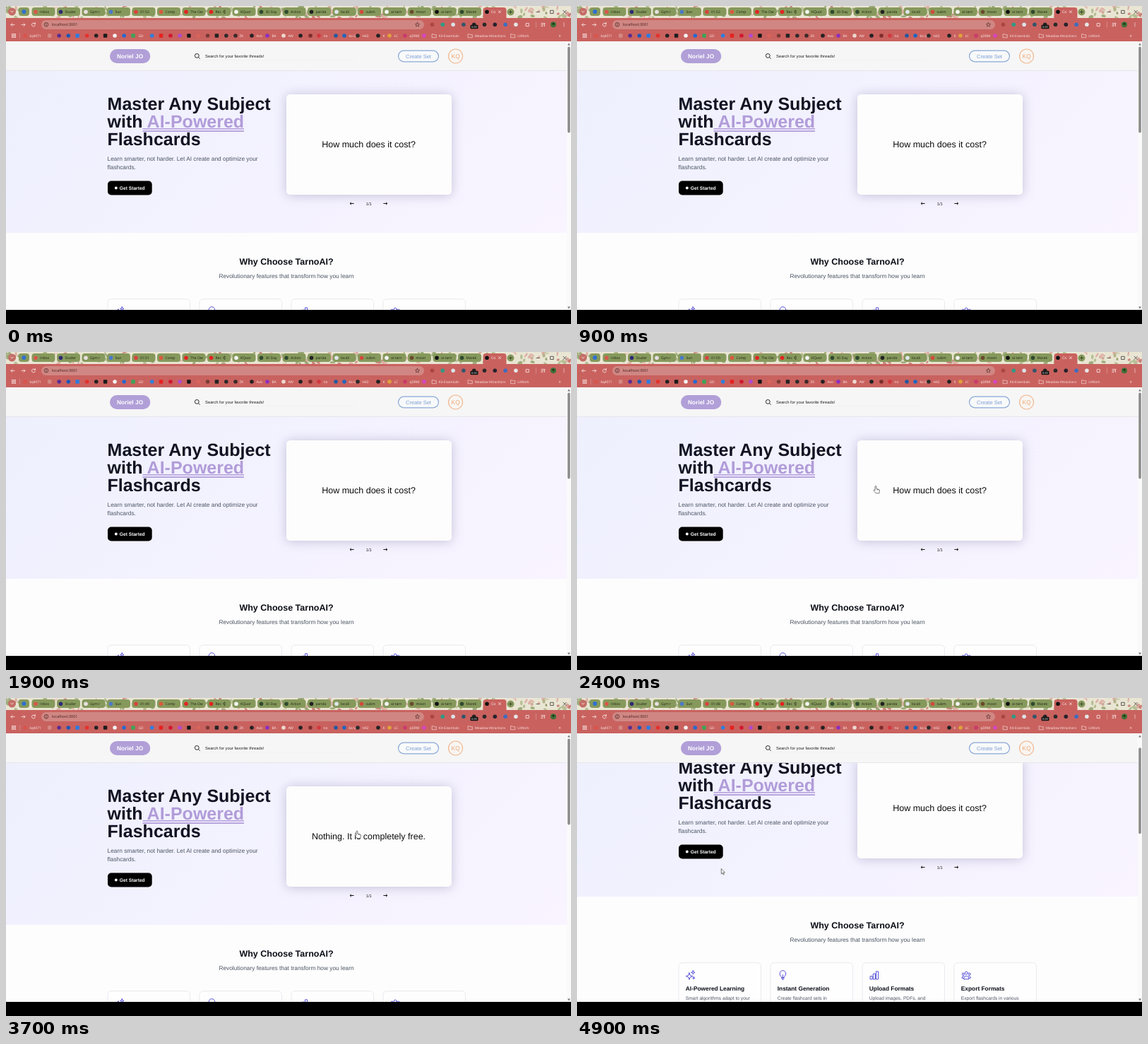
Write an HTML page that moves like this. It is 800x450 px and loops after 5000 ms.

```html
<!DOCTYPE html>
<html lang="en">
<head>
<meta charset="utf-8">
<title>Flashcards</title>
<style>
  html, body { margin: 0; width: 100%; height: 100%; overflow: hidden; background: #000; }
  svg { display: block; width: 800px; height: 450px; }
  text { font-family: "Liberation Sans", Arial, sans-serif; white-space: pre; text-rendering: geometricPrecision; }
  .ui text { font-family: "Open Sans", "Noto Sans", sans-serif; }
  #card { filter: drop-shadow(0 1px 8px rgba(70, 60, 120, .28)); }
</style>
</head>
<body>
<svg id="stage" viewBox="0 0 800 450">
  <defs>
    <linearGradient id="hero" gradientUnits="userSpaceOnUse" x1="141" y1="-50" x2="653" y2="462">
      <stop offset="0" stop-color="#eef0fe"/><stop offset="1" stop-color="#f9f4ff"/>
    </linearGradient>
    <clipPath id="view"><rect y="50" width="794" height="380"/></clipPath>
    <clipPath id="strip"><rect width="800" height="17"/></clipPath>
  </defs>
  <rect width="800" height="430" fill="#fdfdfd"/>
  <g clip-path="url(#view)"><g id="page">
    <rect y="91" width="794" height="230" fill="url(#hero)"/>
    <g font-size="25" font-weight="700" fill="#111322">
      <text x="143.6" y="146.7">Master Any Subject</text>
      <text x="143.6" y="171.7">with<tspan fill="#b19cd9"> AI-Powered</tspan></text>
      <text x="143.6" y="196.7">Flashcards</text>
    </g>
    <path d="M193.5 173.7H337M193.5 177.1H337" stroke="#b19cd9" stroke-width="1.6"/>
    <g font-size="8.33" fill="#4b5563">
      <text x="143.6" y="219.3">Learn smarter, not harder. Let AI create and optimize your</text>
      <text x="143.6" y="231">flashcards.</text>
      <text x="397" y="385" text-anchor="middle">Revolutionary features that transform how you learn</text>
    </g>
    <rect x="144" y="247.5" width="62.7" height="20" rx="5" fill="#000"/>
    <circle cx="155.8" cy="257.5" r="1.9" fill="#fff"/>
    <text x="160.8" y="259.8" font-size="6.67" font-weight="700" fill="#fff">Get Started</text>
    <path id="card" fill="#fdfdfd"/>
    <text id="face" text-anchor="middle" y="4.3" font-size="12.5" fill="#0c0c0e"></text>
    <path d="M492.5 279.5H487M488.8 277.8L487 279.5L488.8 281.2M534.4 279.5H539.9M538.1 277.8L539.9 279.5L538.1 281.2"
      fill="none" stroke="#111" stroke-width="1"/>
    <text x="513.7" y="281.6" text-anchor="middle" font-size="5.83" fill="#222">1/1</text>
    <text x="397" y="366.4" text-anchor="middle" font-size="12.5" font-weight="700" fill="#0d0f18">Why Choose TarnoAI?</text>
    <g id="features"></g>
  </g></g>

  <g id="header">
    <rect y="50" width="794" height="41.5" fill="#f6f6f6"/>
    <path d="M0 91.5H794" stroke="#e3e3e8" stroke-width=".8"/>
    <rect x="147" y="61" width="57.3" height="20" rx="10" fill="#b19fd8"/>
    <text x="175.6" y="74" text-anchor="middle" font-size="8.33" font-weight="700" fill="#fff">Noriel JO</text>
    <path d="M266 76.8H489Q493 76.5 493 72" fill="none" stroke="#f0f0f1" stroke-width=".7"/>
    <g fill="none" stroke="#222" stroke-width="1"><circle cx="270.3" cy="70.4" r="2.9"/><path d="M272.4 72.5L274.6 74.7"/></g>
    <text x="282" y="73.2" font-size="5.83" fill="#222">Search for your favorite threads!</text>
    <rect x="555.5" y="63.2" width="57" height="15.6" rx="7.8" fill="#f8f9fa" stroke="#8ba9d8" stroke-width="1.2"/>
    <text x="584" y="73.6" text-anchor="middle" font-size="7.5" fill="#7f9fd4">Create Set</text>
    <circle cx="636.6" cy="71" r="10" fill="#f8f5f2" stroke="#f0b78f" stroke-width="1.2"/>
    <text x="636.6" y="74" text-anchor="middle" font-size="8.3" fill="#eba777">KQ</text>
  </g>

  <rect x="794" y="50" width="6" height="380" fill="#fafafa"/>
  <path d="M795 55.5L797 52.5L799 55.5ZM795 425.5L797 428.5L799 425.5Z" fill="#777"/>
  <rect id="thumb" x="795.2" y="57.5" width="3.6" height="122" rx="1.8" fill="#8c8c8c"/>

  <g class="ui">
    <rect width="800" height="17" fill="#e9e5d3"/>
    <g id="floral" clip-path="url(#strip)"></g>
    <g id="tabs"></g>
    <rect y="17" width="800" height="33" fill="#c9625f"/>
    <rect x="50" y="20" width="542" height="13" rx="6.5" fill="#d08783"/>
    <g id="bar"></g>
  </g>

  <g id="cursor" fill="#fff" stroke="#333" stroke-width=".65" stroke-linejoin="round">
    <path id="hand" d="M-1 1C-1-.3.9-.3.9 1V4.2L3.8 4.8C5.2 5.1 5.6 5.7 5.4 7L4.8 10.4H.2L-2.8 6.8C-3.3 5.8-2.3 5.2-1 6.4ZM2.4 4.6V6M4 5V6.3"/>
    <path id="arrow" d="M0 0V7.4L1.7 5.9L2.8 8.5L4 8L2.9 5.5H5.2Z"/>
  </g>
  <rect y="430" width="800" height="20" fill="#000"/>
</svg>
<script>
const LOOP = 5000;
const $ = id => document.getElementById(id);

function add(parent, tag, attrs, text) {
  const node = document.createElementNS("http://www.w3.org/2000/svg", tag);
  for (const key in attrs) node.setAttribute(key, attrs[key]);
  if (text) node.textContent = text;
  parent.appendChild(node);
  return node;
}
const dot = (parent, x, y, r, fill) => add(parent, "circle", { cx: x, cy: y, r, fill });
const label = (parent, x, y, size, fill, text) => add(parent, "text", { x, y, "font-size": size, fill }, text);
const line = (parent, d, stroke, width) =>
  add(parent, "path", { d, stroke, "stroke-width": width, fill: "none", "stroke-linecap": "round", "stroke-linejoin": "round" });

function seeded(seed) {
  return () => (seed = (seed * 16807) % 2147483647) / 2147483647;
}

// Leaves and roses behind the tabs
function drawFloral() {
  const rnd = seeded(77), tones = ["#8b9d66", "#efe9db", "#d9a59c", "#a9b585", "#f1e6da", "#c4736c"];
  for (let i = 0; i < 260; i++) {
    const x = rnd() * 800, y = rnd() * 17;
    add($("floral"), "ellipse", {
      cx: x, cy: y, rx: 1.5 + rnd() * 3, ry: 1 + rnd() * 1.6,
      fill: tones[Math.floor(rnd() * tones.length)], opacity: .8,
      transform: `rotate(${rnd() * 180} ${x} ${y})`
    });
  }
}

function drawTabs() {
  const g = $("tabs"), green = "#86995c";
  const tabs = [
    ["Inbox", "#d8574a"], ["Studer", "#2d2a72"], ["Gym r", "#e8dfe4"], ["Sun", "#4a79c9"], ["01:52", "#d8433c"],
    ["Comp", "#d9593c"], ["The Ow", "#e32320"], ["Rec", "#e32320"], ["KQuor", "#f4f4f4"], ["30 Day", "#2f4a2f"],
    ["Action", "#2f4a2f"], ["panda", "#222"], ["locali", "#dfe8ee"], ["subm", "#d24a3c"], ["ai-tarn", "#f4f4f4"],
    ["moon", "#6b4a2c"], ["ai-tarn", "#111"], ["Marek", "#2f4a2f"], ["Co", "#111"]
  ];
  let clock;
  dot(g, 8.5, 8, 5.5, "#c46d66");
  line(g, "M6.8 7.2L8.5 8.9L10.2 7.2", "#fff", .8);
  add(g, "rect", { x: 18, y: 2, width: 15, height: 12, rx: 4, fill: green });
  dot(g, 25.4, 8, 3, "#2f6fd0");
  tabs.forEach(([name, color], i) => {
    const x = 36.5 + 35.5 * i, active = i === tabs.length - 1;
    add(g, "rect", {
      x, y: 2, width: 33, height: active ? 18 : 12, rx: 4, fill: active ? "#c9625f" : green
    });
    dot(g, x + 5.5, 8.2, 2.8, color);
    const title = label(g, x + 11.5, 10, 5, active ? "#fff" : "#1d2413", name);
    if (i === 4) clock = title;
    if (i === 7) line(g, `M${x + 23} 7.2v2l2 1.4v-4.8l-2 1.4`, "#1d2413", .6);
  });
  line(g, "M697.5 6.7l3 3m0-3l-3 3", "#fff", .7);
  dot(g, 714.5, 8.5, 5, green);
  line(g, "M712.3 8.5h4.4m-2.2-2.2v4.4", "#26301a", .7);
  line(g, "M751 8.5h4.5M771 6.3h4.2v4.2h-4.2zM789 6.2l4.4 4.4m0-4.4l-4.4 4.4", "#222", .7);
  return clock;
}

function drawBar() {
  const g = $("bar"), ink = "#fbecea", dark = "#43201f";
  line(g, "M12 26.5H7m2-2L7 26.5l2 2M22 26.5h5m-2-2l2 2l-2 2", ink, .8);
  line(g, "M41 25a2.5 2.5 0 1 0 .4 2.2M41.4 23.4v1.9h-1.9", ink, .8);
  add(g, "circle", { cx: 57, cy: 26.3, r: 2.8, fill: "none", stroke: dark, "stroke-width": .7 });
  line(g, "M57 26v1.5M57 24.9v.1", dark, .7);
  label(g, 65, 28.3, 5.4, dark, "localhost:3001");
  line(g, "M582.5 23.3l.9 2l2.2.2l-1.7 1.4l.5 2.2l-1.9-1.2l-1.9 1.2l.5-2.2l-1.7-1.4l2.2-.2z", dark, .6);

  ["#a94740", "#2f9a83", "#dbe2e6", "#35556b", "#222", "#292929", "#27232b", "#3f6cc0", "#e5e5e5"]
    .forEach((c, i) => dot(g, 603.5 + 14.8 * i, 26.3, 2.8, c));
  add(g, "rect", { x: 657.5, y: 26.8, width: 11, height: 5.4, rx: 1.2, fill: "#111" });
  label(g, 658.9, 31.2, 4, "#fff", "0.00");
  line(g, "M736.5 24.6h3.8v4h-3.8z", ink, .8);
  line(g, "M750.5 22.5v7.5", "#e39b97", .7);
  line(g, "M758 24.5h5m-5 2h3m-3 2h2m2.5 0v-3", ink, .8);
  dot(g, 775, 26.3, 4, "#3f6f35");
  dot(g, 775, 25.3, 1.4, "#1d2a1a");
  for (const y of [24.2, 26.4, 28.6]) dot(g, 790, y, .65, ink);

  for (let i = 0; i < 9; i++)
    add(g, "rect", { x: 8 + (i % 3) * 2.2, y: 39 + Math.floor(i / 3) * 2.2, width: 1.5, height: 1.5, fill: ink });
  line(g, "M19.5 38.5v7", "#e39b97", .6);

  const marks = ["#d38a84", "#5a2d91", "#1f57b5", "#2c7be0", "#e5322d", "#222", "#1b1b1b", "#f2f2f2", "#2869cf", "#3aa655",
    "", "#2d7fe0", "#e6201f", "#d3172e", "#b04ad2", "#161616", "#d9645b", "#7a3a35", "#222", "#2b2b2b", "#3a2a2a"];
  marks.forEach((c, i) => {
    const x = 59 + 13.15 * i;
    if (!c) return;
    if (i % 3) dot(g, x + 3, 42, 2.8, c);
    else add(g, "rect", { x, y: 39.3, width: 5.4, height: 5.4, rx: 1, fill: c });
  });
  const named = [[27, "#d9544b", "kq4071"], [181, "", "GD"], [324, "", "ZK"], [348, "#222", "Avo"], [370, "#8c2fc0", "BA"],
    [393, "#ecd9d0", "AW"], [417, "#222", ""], [431, "#7d2d2d", ""], [443, "#d3383f", "no"], [467, "#24589f", ""],
    [479, "#1f66c0", "ko U"], [498, "#2b2b2b", "H42"], [527, "#222", "K"], [543, "#e0a13a", "LC"],
    [565, "#c93a6d", "qDRM"], [592, "#d645c0", ""]];
  for (const [x, c, name] of named) {
    if (c) dot(g, x, 42, 2.8, c);
    label(g, x + 6.5, 43.8, 4.8, ink, name);
  }
  for (const [x, name] of [[603.5, "Kit-Essentials"], [654.5, "Meadow Attractions"], [715, "UiWork"]]) {
    line(g, `M${x} 39.8h2l.8.9h3v4h-5.8z`, ink, .6);
    label(g, x + 9.3, 43.8, 4.7, ink, name);
  }
  label(g, 782.5, 44, 6.5, ink, "»");
}

function drawFeatures() {
  const items = [
    ["AI-Powered Learning", "Smart algorithms adapt to your",
      "M4.5 3.2L5.8 6.7L9.3 8L5.8 9.3L4.5 12.8L3.2 9.3L-.2 8L3.2 6.7ZM9.8 0l.7 2l2 .7l-2 .7l-.7 2l-.7-2l-2-.7l2-.7zM10.8 9l.4 1.2l1.2.4l-1.2.4l-.4 1.2l-.4-1.2l-1.2-.4l1.2-.4z"],
    ["Instant Generation", "Create flashcard sets in",
      "M5 9.5C5 7.9 2.6 7.3 2.6 4.3A4.3 4.3 0 0 1 11.2 4.3C11.2 7.3 8.8 7.9 8.8 9.5ZM5.2 11h3.4M5.8 12.5h2.2M6.9 9.3V6"],
    ["Upload Formats", "Upload images, PDFs, and",
      "M1 8h2.6v4.3H1zM5.2 4.5h2.6v7.8H5.2zM9.4 1.2h2.6v11.1H9.4z"],
    ["Export Formats", "Export flashcards in various",
      "M8.7 3.5a2 2 0 1 1-4 0a2 2 0 1 1 4 0M3 11.8C3 6.2 10.4 6.2 10.4 11.8ZM3.5 5a1.3 1.3 0 1 1-2.5 0a1.3 1.3 0 1 1 2.5 0M12.4 5a1.3 1.3 0 1 1-2.5 0a1.3 1.3 0 1 1 2.5 0M2.8 10.6H.6C.5 8.5 1.8 7.5 3.5 8M10.6 10.6h2.2C12.9 8.5 11.6 7.5 9.9 8"]
  ];
  items.forEach(([title, text, icon], i) => {
    const g = add($("features"), "g", { transform: `translate(${144 + 130 * i} 414.7)` });
    add(g, "rect", { width: 116.5, height: 75, rx: 5, fill: "#fefefe", stroke: "#e4e5ec", "stroke-width": .8 });
    line(g, icon, "#554fd8", 1).setAttribute("transform", "translate(10.5 11)");
    label(g, 9.8, 39, 8.33, "#0d0f18", title).setAttribute("font-weight", "700");
    label(g, 9.8, 52.4, 6.67, "#4b5563", text);
  });
}

const clamp = v => Math.min(1, Math.max(0, v));
const smooth = v => v * v * (3 - 2 * v);

// The CSS "ease" curve
function ease(p) {
  let lo = 0, hi = 1, s = p;
  for (let i = 0; i < 24; i++) {
    s = (lo + hi) / 2;
    const x = .75 * s * (1 - s) + s ** 3;
    if (x < p) lo = s; else hi = s;
  }
  return .3 * s * (1 - s) ** 2 + 3 * s * s * (1 - s) + s ** 3;
}

const CARD = { x: 514, y: 196, w: 117, h: 71, r: 5.5, depth: 417 };

function cardPath(angle) {
  const pts = [];
  for (let i = 0; i < 4; i++) {
    const sx = i === 0 || i === 3 ? 1 : -1, sy = i < 2 ? 1 : -1;
    for (let k = 0; k <= 6; k++) {
      const a = (i + k / 6) * Math.PI / 2;
      const x = sx * (CARD.w - CARD.r) + CARD.r * Math.cos(a);
      const y = sy * (CARD.h - CARD.r) + CARD.r * Math.sin(a);
      const zoom = CARD.depth / (CARD.depth - y * Math.sin(angle));
      pts.push(`${(CARD.x + x * zoom).toFixed(2)} ${(CARD.y + y * Math.cos(angle) * zoom).toFixed(2)}`);
    }
  }
  return "M" + pts.join("L") + "Z";
}

// time, x, y of the pointer tip
const POINTER = [[2100, 455, 430], [2380, 423, 189.5], [2480, 423, 189.5], [2750, 497, 188], [3750, 497, 188],
  [4250, 425.5, 204.5], [4450, 425.5, 204.5], [4720, 204.3, 241.5], [5000, 204.3, 241.5]];

function pointerAt(t) {
  const i = Math.max(1, POINTER.findIndex(p => p[0] > t));
  const [a, b] = [POINTER[i - 1], POINTER[i]];
  const k = smooth(clamp((t - a[0]) / (b[0] - a[0])));
  return [a[1] + (b[1] - a[1]) * k, a[2] + (b[2] - a[2]) * k];
}

drawFloral();
const clock = drawTabs();
drawBar();
drawFeatures();

function render(t) {
  clock.textContent = "01:" + (52 - Math.max(0, Math.floor((t - 200) / 1000)));

  const turn = ease(clamp((t - 2930) / 600)) - ease(clamp((t - 3930) / 600));
  const back = turn > .5;
  const angle = (back ? turn - 1 : turn) * Math.PI;
  $("card").setAttribute("d", cardPath(angle));
  $("face").textContent = back ? "Nothing. It is completely free." : "How much does it cost?";
  $("face").setAttribute("transform", `translate(${CARD.x - .5} ${CARD.y}) scale(1 ${Math.cos(angle)})`);

  const scroll = 40 * smooth(clamp((t - 4700) / 200));
  $("page").setAttribute("transform", `translate(0 ${-scroll})`);
  $("thumb").setAttribute("y", 57.5 + scroll * .32);

  const [x, y] = pointerAt(t);
  const over = Math.abs(x - CARD.x) < CARD.w && Math.abs(y - CARD.y) < CARD.h;
  $("cursor").setAttribute("transform", `translate(${x} ${y})`);
  $("cursor").setAttribute("visibility", t < POINTER[0][0] ? "hidden" : "visible");
  $("hand").setAttribute("display", over ? "inline" : "none");
  $("arrow").setAttribute("display", over ? "none" : "inline");
}

const start = performance.now();
function tick() {
  render((performance.now() - start) % LOOP);
  requestAnimationFrame(tick);
}
tick();
</script>
</body>
</html>
```
